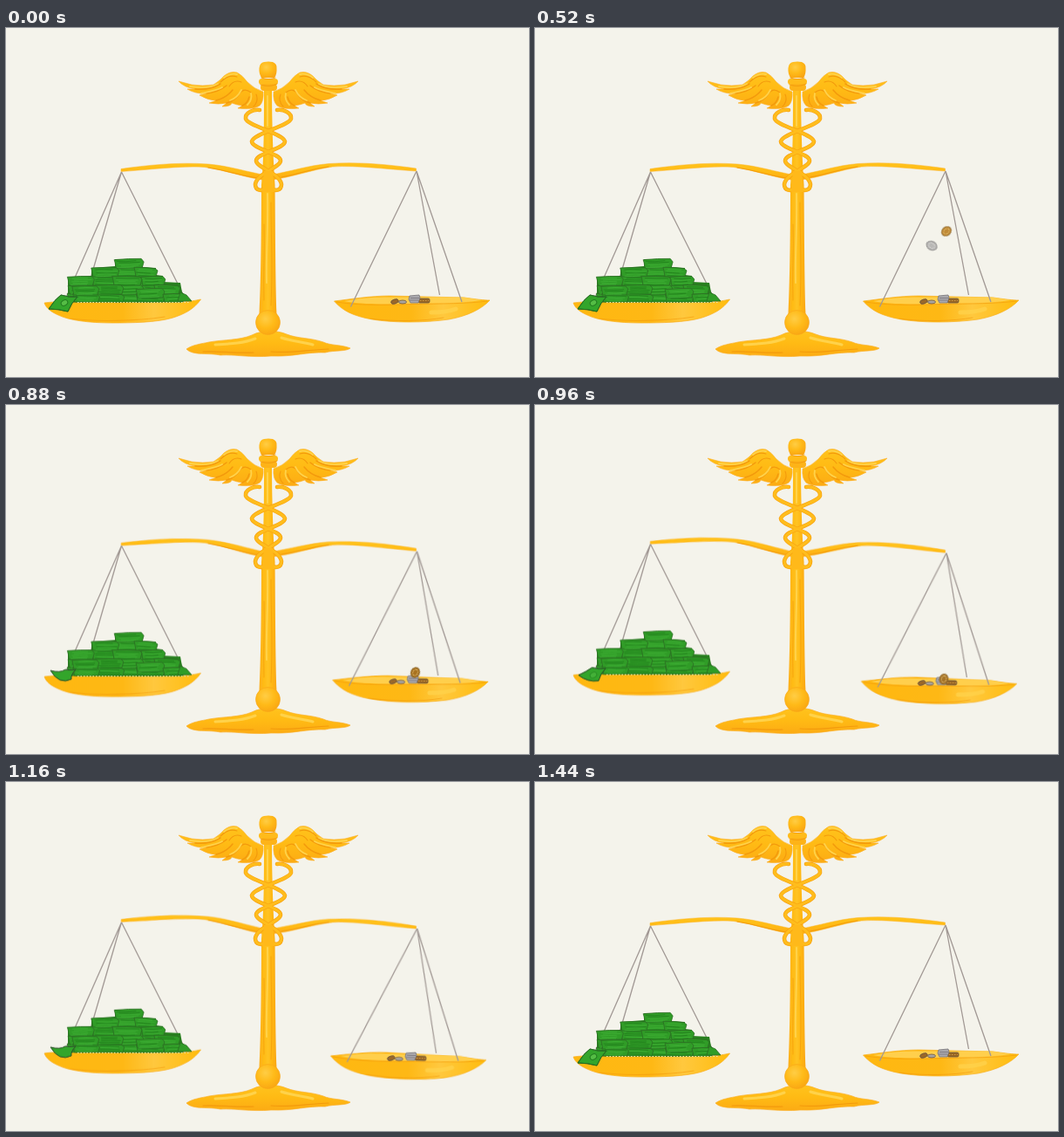
Animation of 600 by 400 pixels, one loop 5000 ms. Source, as an HTML page:

```html
<!DOCTYPE html>
<html lang="en">
<head>
<meta charset="utf-8">
<title>Scales</title>
<style>
html, body { margin: 0; width: 100%; height: 100%; overflow: hidden; background: #f4f3eb; }
svg { display: block; width: 100vw; height: 100vh; }
.strings { stroke: #a19894; stroke-width: 1.3; fill: none; }
.dark { stroke: #f39a0c; fill: none; stroke-linecap: round; }
.light { stroke: #ffd24a; fill: none; stroke-linecap: round; }
#beam, #left, #right, .coin, #bill path, #bill g { animation: 5s linear infinite; }
#beam { animation-name: tilt; transform-origin: 301px 168px; }
#left { animation-name: lift; }
#right { animation-name: swing; transform-origin: 471px 164px; }
#bill path { animation-name: flap; }
#bill g { animation-name: face; }
#silver { animation-name: silver; }
#gold { animation-name: gold; }
@keyframes tilt {
  0%, 13.6% { transform: rotate(0deg); }
  17.6% { transform: rotate(1.15deg); }
  20% { transform: rotate(2.1deg); }
  20.8% { transform: rotate(2deg); }
  22.4% { transform: rotate(1.5deg); }
  25.6% { transform: rotate(1.1deg); }
  28.8%, 100% { transform: rotate(0deg); }
}
@keyframes lift {
  0%, 13.6% { transform: translateY(0); }
  17.6% { transform: translateY(-3.7px); }
  20% { transform: translateY(-6.4px); }
  20.8% { transform: translateY(-6px); }
  22.4% { transform: translateY(-4.6px); }
  25.6% { transform: translateY(-3px); }
  28.8%, 100% { transform: translateY(0); }
}
@keyframes swing {
  0%, 13.6% { transform: translate(0, 0) rotate(0deg); }
  17.6% { transform: translate(.5px, 3.7px) rotate(.9deg); }
  20% { transform: translate(1.2px, 6.6px) rotate(1.4deg); }
  20.8% { transform: translate(1.2px, 6px) rotate(1.6deg); }
  22.4% { transform: translate(.8px, 4.4px) rotate(1.8deg); }
  25.6% { transform: translate(.3px, 2.7px) rotate(2deg); }
  28.8%, 100% { transform: translate(0, 0) rotate(0deg); }
}
@keyframes flap {
  0%, 14.4%, 20%, 21.6%, 28%, 100% { d: path("M49 322Q56 311 63 306Q72 309 82 308Q75 315 71 325Q60 322 49 322Z"); }
  16%, 18.4%, 23.2%, 26.4% { d: path("M51 308Q62 311 68 307Q74 308 80 307Q74 313 75 318Q61 325 51 308Z"); }
}
@keyframes face {
  0%, 14.4%, 20%, 21.6%, 28%, 100% { opacity: 1; }
  16%, 18.4%, 23.2%, 26.4% { opacity: 0; }
}
@keyframes silver {
  0%, .4% { transform: translate(470px, 184px) rotate(-60deg); opacity: 0; animation-timing-function: ease-out; }
  6.4% { transform: translate(455px, 240px) rotate(25deg); opacity: .85; }
  8.08% { transform: translate(455px, 240px) rotate(27deg); opacity: 1; animation-timing-function: cubic-bezier(.33, 0, .67, .33); }
  14.5% { transform: translate(456px, 312px) rotate(34deg); opacity: 1; }
  15.2%, 100% { transform: translate(457px, 314px) rotate(34deg); opacity: 0; }
}
@keyframes gold {
  0%, .4% { transform: translate(490px, 178px) rotate(40deg); opacity: 0; fill: #dcbb82; animation-timing-function: ease-out; }
  6.4% { transform: translate(472px, 233px) rotate(-25deg); opacity: .9; fill: #dcbb82; }
  10.86% { transform: translate(472px, 233px) rotate(-42deg); opacity: 1; fill: #bd842c; animation-timing-function: cubic-bezier(.33, 0, .67, .33); }
  17.6% { transform: translate(469.5px, 306.500px) rotate(-65deg); opacity: 1; fill: #a87220; }
  19.2% { transform: translate(469px, 314px) rotate(-75deg); opacity: 1; fill: #a87220; }
  19.6%, 100% { transform: translate(469px, 317px) rotate(-75deg); opacity: 0; fill: #a87220; }
}
</style>
</head>
<body>
<svg viewBox="0 0 600 400" preserveAspectRatio="none">
  <defs>
    <linearGradient id="post">
      <stop offset="0" stop-color="#fbad1c"/><stop offset=".25" stop-color="#ffbb14"/>
      <stop offset=".5" stop-color="#ffc322"/><stop offset=".75" stop-color="#ffb611"/>
      <stop offset="1" stop-color="#f9a516"/>
    </linearGradient>
    <linearGradient id="fall" x2="0" y2="1">
      <stop offset="0" stop-color="#ffc31c"/><stop offset=".5" stop-color="#ffba14"/>
      <stop offset="1" stop-color="#fcab14"/>
    </linearGradient>
    <radialGradient id="ball" cx=".4" cy=".35" r=".75">
      <stop offset="0" stop-color="#ffcd45"/><stop offset=".5" stop-color="#ffba18"/>
      <stop offset="1" stop-color="#f8a212"/>
    </radialGradient>
    <linearGradient id="dish">
      <stop offset="0" stop-color="#ffb810"/><stop offset=".5" stop-color="#feb815"/>
      <stop offset=".7" stop-color="#ffc83e"/><stop offset="1" stop-color="#ffbc0c"/>
    </linearGradient>
    <g id="wing">
      <path fill="url(#fall)" stroke="#fbb02c" stroke-width=".6" d="M198 61L213 65Q226 67 238 65Q246 60 250 55Q257 49 265 51Q271 54 277 62Q285 70 295 73Q296 84 291 89Q284 94 266 92L271 89Q264 88 259 86Q258 90 248 90L253 86Q244 88 233 86L241 83Q232 83 222 77L230 75Q218 76 208 70L217 70Q204 68 198 61Z"/>
      <g class="dark" stroke-width="1.5">
        <path d="M217 70C228 71 238 69 246 64M230 75C240 74 248 70 253 66M241 83C249 81 256 76 260 71M253 86C260 84 265 80 268 75M271 89C276 87 278 83 279 79"/>
        <path stroke-width="1.1" d="M246 62C252 56 259 54 265 56M256 67C260 61 265 60 270 62M268 75C272 70 276 70 281 74M284 90C288 86 289 81 287 76"/>
      </g>
      <path class="light" stroke-width="1.800" d="M211 67C224 69 236 68 243 64M224 75C233 73 243 71 248 68M250 57C255 53 260 52 265 53M257 83C263 81 267 77 270 71M277 88C281 84 282 79 281 75"/>
    </g>
    <path id="snake" d="M291 94C284 93 274 97 275 104C277 112 318 121 320 130C320 138 287 144 287 152C287 160 314 166 316 179C316 187 308 187 305 184"/>
    <path id="arm" d="M132 161.500C160 157.500 196 153.500 232 156C256 158 276 165 300 169V175C272 171 252 163 228 159.500C200 157.500 160 163 132 164.500Z"/>
  </defs>

  <path fill="url(#fall)" stroke="#fbb02c" stroke-width=".7" d="M207 368C214 363 224 362 233 360C250 357 268 358 282 352C294 346 310 346 322 351C334 356 350 355 364 360C372 364 386 363 395 367C390 371 378 369 366 372C346 371 330 377 304 376C280 378 262 374 246 375C234 372 214 376 207 368Z"/>
  <path class="light" stroke-width="3" d="M240 363C258 362 274 361 286 356M316 355C328 359 342 360 352 363"/>
  <path class="dark" stroke-width="1.200" d="M226 371C244 370 260 373 284 372M304 371C326 373 344 369 370 368"/>

  <use href="#wing"/>
  <use href="#wing" transform="translate(602) scale(-1 1)"/>

  <g id="beam" fill="url(#fall)" stroke="#fcb322" stroke-width=".5">
    <use href="#arm"/>
    <use href="#arm" transform="translate(602.500 -.5) scale(-1 1)"/>
    <path class="dark" stroke-width="1" d="M232 160C252 163 268 169 288 172M370 159C352 161 334 168 316 171"/>
  </g>

  <path fill="url(#post)" d="M296 68H305C305 110 306.500 150 308.500 180C309 230 309 290 310.500 328H290.500C292.500 290 293 230 293 180C296 150 296 110 296 68Z"/>
  <path class="light" stroke-width="2" d="M300 78V112M300 190C301 230 298 260 299 292"/>
  <path class="dark" stroke-width="1" opacity=".7" d="M304 200C304 240 306 270 304 318M296 225C297 254 295 284 296 312"/>

  <g fill="none" stroke-linecap="round">
    <g stroke="#f7a111" stroke-width="4.600"><use href="#snake"/><use href="#snake" transform="translate(602) scale(-1 1)"/></g>
    <g stroke="#ffbd1c" stroke-width="3.200"><use href="#snake"/><use href="#snake" transform="translate(602) scale(-1 1)"/></g>
  </g>
  <path fill="#ffb91a" d="M296 164H306L308 188H294Z"/>

  <path fill="url(#ball)" d="M296 39Q301 38 306 39Q311 41 310.500 46Q311 53 308 57H293Q290 52 290.500 46Q291 40 296 39Z"/>
  <rect x="290" y="58" width="22" height="7" rx="3.500" fill="#ffbb1a"/>
  <rect x="292" y="64" width="19" height="8" rx="4" fill="#fdb318"/>
  <path class="dark" stroke-width="1" d="M293 57C299 59 304 59 309 57M292 65C299 67 305 67 311 64"/>
  <circle cx="300.500" cy="337.500" r="14" fill="url(#ball)" stroke="#f8a51a" stroke-width=".6"/>

  <g id="left">
    <path class="strings" d="M132.500 165L68 311M132.500 165L90 311M132.500 165L206.500 312"/>
    <path fill="url(#dish)" stroke="#f9ae1e" stroke-width=".7" d="M44 315C60 313 70 314 90 314H200C210 314 218 312 223.500 311C216 322 205 328 190 332.500C172 337.500 145 338 122 338C95 338 72 335 60 329C51 325 46 321 44 315Z"/>
    <path class="dark" stroke-width="1.200" opacity=".6" d="M74 333C102 337 150 336 182 331"/>
    <g id="money" stroke-linejoin="round">
      <path fill="#28801f" d="M71 314L71 286L98 284V275L125 273V265L156 265L157 274L172 275V283L180 284V291L200 292L202 303L213 313Z"/>
    </g>
    <path stroke="#e9e8b2" stroke-dasharray="1.500 2" d="M82 314.500H210"/>
    <g id="bill">
      <path fill="#33a52b" stroke="#2e4f2a" stroke-width="1" d="M49 322Q56 311 63 306Q72 309 82 308Q75 315 71 325Q60 322 49 322Z"/>
      <g fill="none" stroke="#227a20">
        <ellipse cx="67" cy="315" rx="4" ry="3" fill="#55bd45" transform="rotate(-30 67 315)"/>
        <path stroke-width=".8" d="M55 320L64 309L77 310L70 321Z"/>
      </g>
    </g>
  </g>

  <g id="right">
    <path fill="url(#dish)" stroke="#f8af1e" stroke-width=".7" d="M376.500 313C394 311 418 307 440 307L526 309C540 311 548 312 555 312C546 322 530 330 508 334C480 338 444 338 420 334C398 330 386 324 376.500 313Z"/>
    <path fill="#ffcf4c" d="M388 313C410 309 425 308.500 440 308.500H524C534 310 540 311 545 312C520 316 490 315 465 316C436 317 408 317 388 313Z"/>
    <path class="dark" stroke-width=".9" opacity=".7" d="M379 314C410 319 440 317 466 316.500C500 316 530 316 552 313M418 333C445 337 480 336 502 332"/>
    <path class="light" stroke-width="5" opacity=".8" d="M488 326C498 326 508 325 516 322"/>
    <g stroke="#6d5840" stroke-width=".8">
      <ellipse cx="446" cy="313.500" rx="4.500" ry="2.500" fill="#9b6828" transform="rotate(-18 446 313.500)"/>
      <ellipse cx="455" cy="314" rx="4.500" ry="2" fill="#aaa5a0"/>
      <rect x="473" y="310" width="13" height="5" rx="1.500" fill="#986522"/>
      <path stroke="#d5a454" d="M475 312.500H485" stroke-dasharray="1.500 1.500"/>
      <path fill="#aaa9ad" stroke="#777479" d="M463 307L474 306L475 309L473 315H464L462 311Z"/>
      <path stroke="#77737a" d="M464 309.500H474M463 312H473"/>
    </g>
    <path class="strings" d="M471 164L395.500 319.500M471 164L497.500 306M471 164L523 314"/>
  </g>

  <g id="silver" class="coin" fill="#b9b8b6" stroke="#8b8988">
    <ellipse rx="6.300" ry="5"/>
    <ellipse rx="3.800" ry="2.700" fill="none" stroke="#dddcd9" stroke-dasharray="1.500 1"/>
  </g>
  <g id="gold" class="coin" stroke="#8b672d">
    <ellipse rx="6" ry="5" stroke-width=".9"/>
    <ellipse rx="3.600" ry="2.700" fill="none" stroke="#e6c477" stroke-dasharray="1.500 1"/>
  </g>
</svg>
<script>
const money = document.getElementById("money");
let seed = 11;
const rnd = () => (seed = seed * 16807 % 2147483647) / 2147483647;
const jit = n => (rnd() - .5) * n;

function path(d, fill, stroke, width) {
  const p = document.createElementNS("http://www.w3.org/2000/svg", "path");
  for (const [k, v] of Object.entries({ d, fill, stroke, "stroke-width": width })) p.setAttribute(k, v);
  money.append(p);
}

function bundle(x, y, w, h) {
  x += jit(3);
  const lean = jit(3);
  path(`M${x} ${y + lean / 2}L${x + w / 2} ${y - .5}L${x + w - 2} ${y - lean / 2}L${x + w + 1} ${y + 3}L${x + w - 1} ${y + h}L${x + 2} ${y + h}L${x + 1} ${y + 4}Z`,
    "#309c27", "#2c6d24", .8);
  for (let i = 2; i < h; i += 1.800) {
    const a = x + 2 + rnd() * 6, b = x + w - 1 - rnd() * 7;
    path(`M${a} ${y + i + lean / 3}Q${(a + b) / 2} ${y + i + jit(3)} ${b} ${y + i - lean / 3}`,
      "none", rnd() < .5 ? "#3fb035" : "#217f1c", .8);
  }
}

// each stack: left, width, top
const stacks = [[124, 33, 263], [98, 31, 273], [147, 26, 273], [70, 30, 283],
                [154, 27, 283], [123, 33, 283], [171, 29, 291], [102, 32, 293],
                [76, 30, 296], [148, 32, 299], [180, 24, 302]];
for (const [x, w, top] of stacks)
  for (let y = 305; y > top - 5; y -= 10) bundle(x, Math.max(y, top), w, Math.min(10, 314 - Math.max(y, top)));
path("M200 303L207 306L213 313H197Z", "#309c27", "#2c6d24", .8);
</script>
</body>
</html>
```
